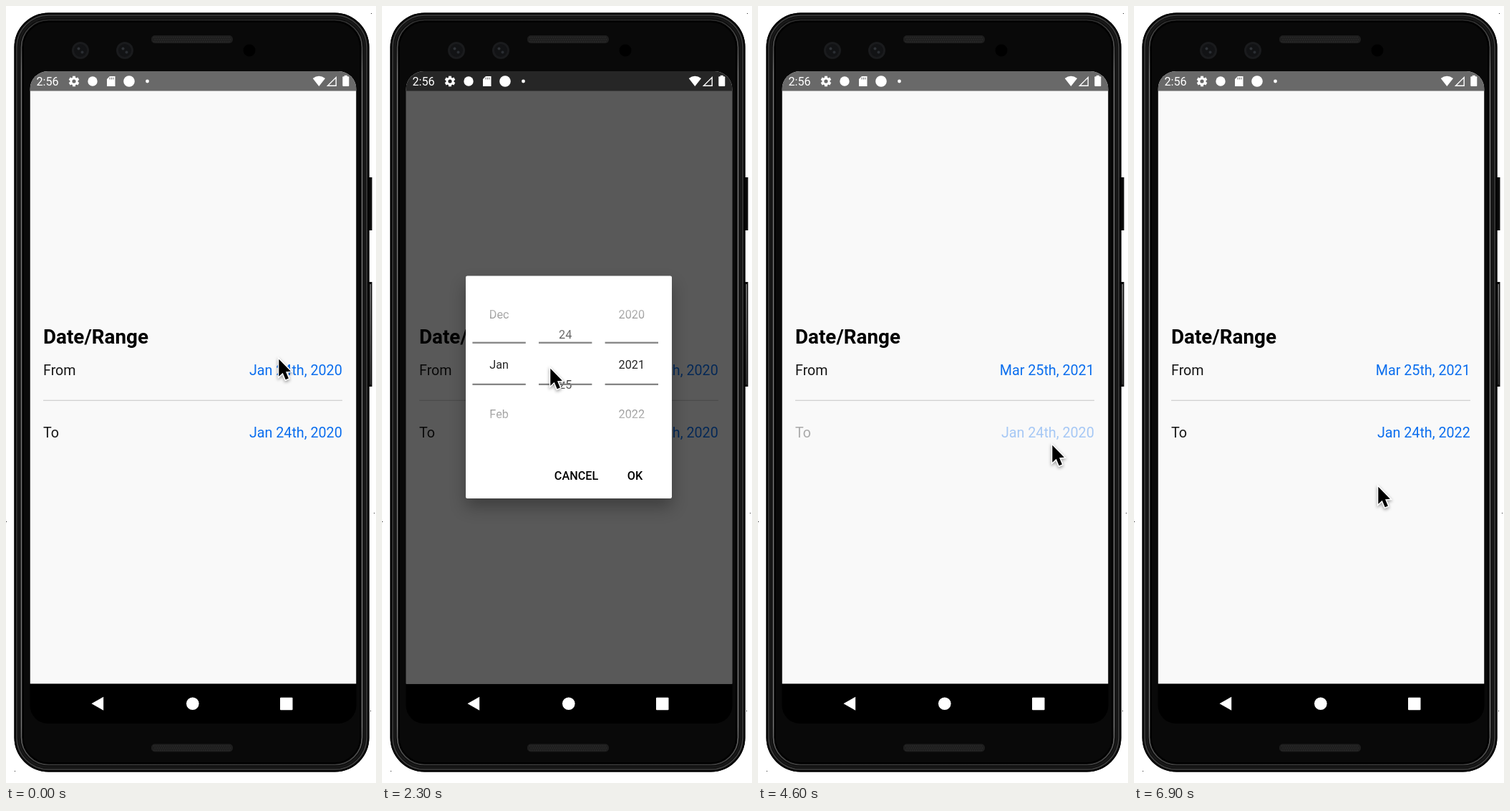
Write an HTML page with a canvas that moves like this. It is 517x1084 px and loops after 7 s.

```html
<!DOCTYPE html>
<html lang="en">
<head>
<meta charset="utf-8">
<title>Date range picker</title>
<style>
html, body { margin: 0; width: 100%; height: 100%; overflow: hidden; background: #fff; }
canvas { display: block; width: 517px; height: 1084px; }
</style>
</head>
<body>
<canvas id="stage" width="517" height="1084"></canvas>
<script>
const W = 517, H = 1084, LOOP = 7000, STEP = 100;
const ROW_GAP = 69.4;
const stage = document.getElementById('stage').getContext('2d');

function makeLayer() {
  const c = document.createElement('canvas');
  c.width = W;
  c.height = H;
  return c.getContext('2d');
}
const phone = makeLayer(), dialog = makeLayer();

// Each row opens the dialog, spins some wheels and closes it again.
const ROWS = [
  {
    name: 'From', y: 515, before: 'Jan 24th, 2020', after: 'Mar 25th, 2021',
    open: 500, close: 3800,
    spins: {
      year: { start: 1100, time: 400, by: 1 },
      day: { start: 2000, time: 530, by: 1 },
      month: { start: 2600, time: 500, by: 2 }
    }
  },
  {
    name: 'To', y: 601.5, before: 'Jan 24th, 2020', after: 'Jan 24th, 2022',
    open: 4600, close: 6400,
    spins: { year: { start: 5100, time: 445, by: 2 } }
  }
];

// Turning points of the pointer: time, x, y.
const PATH = [
  [0, 381, 491], [600, 381, 494], [1100, 345, 590], [1300, 345, 500],
  [1600, 443, 555], [1900, 250, 560], [2300, 235, 504], [2600, 120, 588],
  [2900, 160, 440], [3200, 442, 619], [3800, 329, 648], [4600, 411, 611],
  [5000, 437, 652], [5300, 335, 355], [5500, 269, 513], [6000, 432, 630],
  [6400, 341, 655], [6900, 341, 669]
];

function ease(t, start, time) {
  const p = Math.min(1, Math.max(0, (t - start) / time));
  return p * p * (3 - 2 * p);
}

function pointer(t) {
  const i = Math.max(1, PATH.findIndex(k => k[0] >= t));
  const [t0, x0, y0] = PATH[i - 1], [t1, x1, y1] = PATH[i];
  const p = ease(t, t0, t1 - t0);
  return [x0 + (x1 - x0) * p, y0 + (y1 - y0) * p];
}

const shade = (row, t) => ease(t, row.open, 240) * (1 - ease(t, row.close, 300));
const visible = (row, t) => ease(t, row.open, 180) * (1 - ease(t, row.close, 200));
const pressed = (row, t) => ease(280 - Math.abs(t - row.open), 0, 280);

function rounded(g, x, y, w, h, r) {
  g.beginPath();
  g.roundRect(x, y, w, h, r);
}

function disc(g, x, y, r, color) {
  g.fillStyle = color;
  g.beginPath();
  g.arc(x, y, r, 0, Math.PI * 2);
  g.fill();
}

function poly(g, ...p) {
  g.beginPath();
  for (let i = 0; i < p.length; i += 2) g.lineTo(p[i], p[i + 1]);
  g.closePath();
}

function label(g, text, x, y, size, color, align = 'left', weight = 400) {
  g.font = `${weight} ${size}px Roboto, sans-serif`;
  g.textAlign = align;
  g.fillStyle = color;
  g.fillText(text, x, y);
}

function displayPath(g) {
  rounded(g, 33.5, 91, 456, 910, 25);
}

function bodyPath(g, inset) {
  rounded(g, 11.5 + inset, 9.5 + inset, 496 - 2 * inset, 1059 - 2 * inset, 48 - inset);
}

function ring(g, inset, width, color) {
  bodyPath(g, inset);
  g.lineWidth = width;
  g.strokeStyle = color;
  g.stroke();
}

function grille(g, y) {
  rounded(g, 203, y, 114, 11, 5);
  g.fillStyle = '#1e1e1e';
  g.fill();
  g.fillStyle = '#2a2a2a';
  for (let r = 0; r < 3; r++)
    for (let x = 206 + (r % 2) * 1.5; x < 314; x += 3) g.fillRect(x, y + 2 + r * 3, 1.5, 1.5);
}

function lens(g, x) {
  disc(g, x, 62, 12, '#1a1b1d');
  disc(g, x, 62, 9, '#121315');
  disc(g, x - 2.5, 59.5, 2, '#2f3237');
  disc(g, x + 2.5, 64.5, 2, '#2a2d32');
}

function drawPhone(g) {
  g.fillStyle = '#0b0b0b';
  g.fillRect(505, 239, 6.5, 74);
  g.fillRect(505, 385, 6.5, 146);
  const edge = g.createLinearGradient(0, 385, 0, 531);
  edge.addColorStop(0, '#888');
  edge.addColorStop(1, '#333');
  g.fillStyle = edge;
  g.fillRect(508.5, 388, 1.5, 140);

  bodyPath(g, 0);
  g.fillStyle = '#090909';
  g.fill();
  const shine = g.createLinearGradient(0, 9, 0, 1068);
  shine.addColorStop(0, '#222');
  shine.addColorStop(.08, '#777');
  shine.addColorStop(.94, '#777');
  shine.addColorStop(1, '#333');
  ring(g, .7, 1.4, '#000');
  ring(g, 3.5, 1.5, '#404040');
  ring(g, 6.5, 3, '#181818');
  ring(g, 10, 1.6, shine);
  ring(g, 12.3, 2, '#000');

  grille(g, 41);
  grille(g, 1029.5);
  lens(g, 104);
  lens(g, 166);
  disc(g, 340, 62, 8.5, '#000');

  displayPath(g);
  g.fillStyle = '#000';
  g.fill();
  g.fillStyle = '#fff';
  poly(g, 119.5, 973.3, 136.2, 963.8, 136.2, 982.8);
  g.fill();
  disc(g, 260.8, 973.3, 8.8, '#fff');
  rounded(g, 383, 964.7, 17.5, 17.5, 1);
  g.fill();

  g.fillStyle = '#222';
  for (const [x, y] of [[510, 10], [514, 707], [509, 983], [12, 1067], [0, 719]]) g.fillRect(x, y, 1, 1);
}

function drawGear(g, x, y) {
  g.save();
  g.translate(x, y);
  for (let i = 0; i < 6; i++) {
    g.rotate(Math.PI / 3);
    g.fillRect(-2, -7.3, 4, 4);
  }
  g.lineWidth = 3;
  g.beginPath();
  g.arc(0, 0, 4.1, 0, Math.PI * 2);
  g.stroke();
  g.restore();
}

function drawStatus(g) {
  const white = '#fff';
  label(g, '2:56', 42.5, 111, 16.2, white);
  g.strokeStyle = white;
  drawGear(g, 95, 105);
  disc(g, 121, 105, 6.7, white);
  poly(g, 145, 98, 152.5, 98, 152.5, 112, 141, 112, 141, 102);
  g.fill();
  g.fillStyle = '#777';
  for (let i = 0; i < 3; i++) g.fillRect(144.6 + i * 2.4, 99.7, 1.1, 2.8);
  disc(g, 172, 105, 7.8, white);
  disc(g, 197.5, 105, 2.4, white);

  g.beginPath();
  g.moveTo(437.3, 112);
  g.lineTo(428.7, 101);
  g.quadraticCurveTo(437.3, 94.5, 446, 101);
  g.fill();
  g.lineWidth = 1.4;
  poly(g, 449.5, 111.2, 461.2, 111.2, 461.2, 99.6);
  g.stroke();
  rounded(g, 470.3, 98.2, 9, 13.8, 1);
  g.fill();
  g.fillRect(472.8, 96.8, 4, 2);
}

function drawRow(g, row, t) {
  g.globalAlpha = 1 - .65 * pressed(row, t);
  label(g, row.name, 52, row.y, 19.7, '#161616');
  label(g, t > row.close ? row.after : row.before, 469.7, row.y, 19.7, '#0b6eee', 'right');
  g.globalAlpha = 1;
}

function drawScreen(g, t) {
  g.save();
  displayPath(g);
  g.clip();
  g.fillStyle = '#f9f9f9';
  g.fillRect(33.5, 91, 456, 854.5);
  g.fillStyle = '#696969';
  g.fillRect(33.5, 91, 456, 27.5);

  label(g, 'Date/Range', 52, 470.8, 27.8, '#000', 'left', 700);
  g.fillStyle = '#d3d3d3';
  g.fillRect(52, 549.6, 418, 1.4);
  for (const row of ROWS) {
    drawRow(g, row, t);
  }
  for (const row of ROWS) {
    g.fillStyle = `rgba(0,0,0,${.64 * shade(row, t)})`;
    g.fillRect(33.5, 91, 456, 854.5);
  }
  g.restore();
  drawStatus(g);
}

const MONTHS = 'Jan Feb Mar Apr May Jun Jul Aug Sep Oct Nov Dec'.split(' ');
const WHEELS = {
  month: i => MONTHS[(i + 12) % 12],
  day: i => 24 + i,
  year: i => 2020 + i
};

function drawWheel(g, mid, name, pos) {
  const left = mid - 37.2;
  g.save();
  g.beginPath();
  g.rect(left, 405, 74.4, 186);
  g.clip();
  const near = Math.round(pos);
  for (let i = near - 2; i <= near + 2; i++)
    label(g, name(i), mid, 505.8 + (i - pos) * ROW_GAP, 16.2, '#262626', 'center');
  const fade = g.createLinearGradient(0, 392, 0, 608);
  fade.addColorStop(0, '#fff');
  fade.addColorStop(.44, 'rgba(255,255,255,0)');
  fade.addColorStop(.56, 'rgba(255,255,255,0)');
  fade.addColorStop(1, '#fff');
  g.fillStyle = fade;
  g.fillRect(left, 396, 74.4, 208);
  g.restore();
  g.fillStyle = '#858585';
  for (const y of [468.6, 526.7]) g.fillRect(left, y, 74.4, 2.3);
}

function drawDialog(g, row, t) {
  g.clearRect(0, 0, W, H);
  g.save();
  g.shadowColor = 'rgba(0,0,0,.3)';
  g.shadowBlur = 22;
  g.shadowOffsetY = 12;
  g.fillStyle = '#fff';
  rounded(g, 117, 376.5, 288, 310.5, 2.3);
  g.fill();
  g.restore();
  Object.keys(WHEELS).forEach((key, i) => {
    const spin = row.spins[key];
    const pos = spin ? spin.by * ease(t, spin.start, spin.time) : 0;
    drawWheel(g, 163.6 + i * 92.6, WHEELS[key], pos);
  });
  label(g, 'CANCEL', 271.5, 661, 16.2, '#000', 'center', 500);
  label(g, 'OK', 353.5, 661, 16.2, '#000', 'center', 500);
}

function drawPointer(g, x, y) {
  g.save();
  g.translate(x + .3, y + 1.7);
  poly(g, 0, 0, 0, 24, 5.4, 19, 9.4, 28.6, 13.6, 26.8, 9.7, 17.6, 16.6, 17);
  g.shadowColor = 'rgba(0,0,0,.4)';
  g.shadowBlur = 4;
  g.shadowOffsetY = 2;
  g.lineWidth = 3;
  g.strokeStyle = '#fff';
  g.stroke();
  g.shadowColor = 'transparent';
  g.fillStyle = '#000';
  g.fill();
  g.restore();
}

function render(t) {
  const g = stage;
  g.fillStyle = '#fff';
  g.fillRect(0, 0, W, H);
  g.drawImage(phone.canvas, 0, 0);
  drawScreen(g, t);
  for (const row of ROWS) {
    const alpha = visible(row, t);
    if (!alpha) continue;
    drawDialog(dialog, row, t);
    g.globalAlpha = alpha;
    g.drawImage(dialog.canvas, 0, 0);
    g.globalAlpha = 1;
  }
  drawPointer(g, ...pointer(t));
}

drawPhone(phone);
const start = performance.now();
let shown = -1;
function tick() {
  const t = Math.floor(((performance.now() - start) % LOOP) / STEP) * STEP;
  if (t !== shown) render(shown = t);
  requestAnimationFrame(tick);
}
tick();
</script>
</body>
</html>
```
